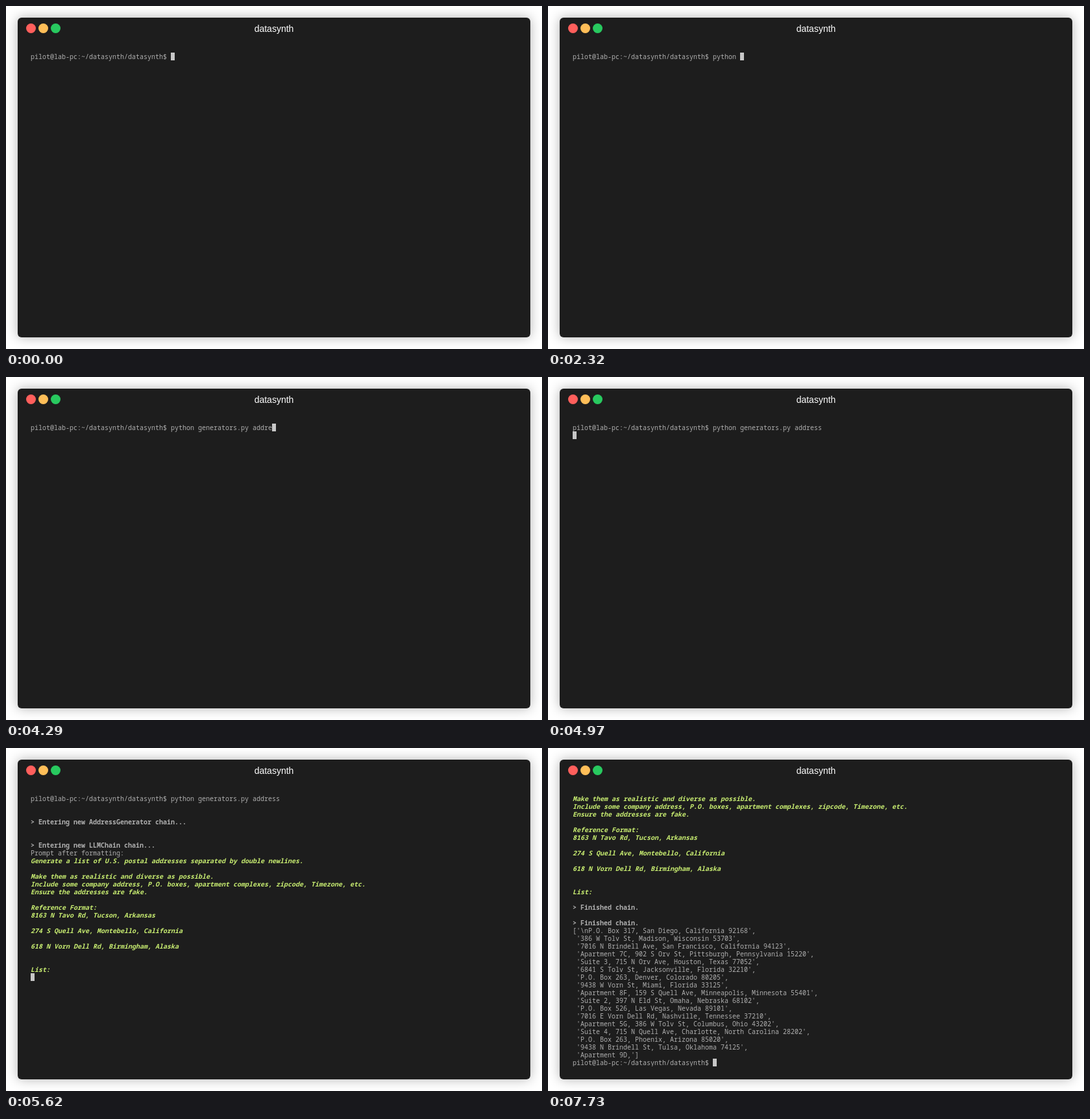
These frames come from a looping animation (826 px wide and 530 px high, 8 s). An HTML page:

```html
<!DOCTYPE html>
<html lang="en">
<head>
<meta charset="utf-8">
<title>datasynth</title>
<style>
  html, body { margin: 0; width: 100%; height: 100%; overflow: hidden; background: #fff; }
  #window {
    position: absolute; left: 18px; top: 18px; width: 790px; height: 494px;
    border-radius: 6px; background: #1d1d1d; box-shadow: 0 0 18px rgba(0, 0, 0, .3);
  }
  .dot { position: absolute; top: 9px; width: 15px; height: 15px; border-radius: 50%; }
  #title {
    position: absolute; left: 0; top: 9px; width: 790px; text-align: center;
    font: 14px/16px "Liberation Sans", Arial, sans-serif; color: #fff;
  }
  #screen {
    position: absolute; left: 20px; top: 54px; width: 750px; height: 420px; overflow: hidden;
    font: 10px/12px "Noto Sans Mono", "DejaVu Sans Mono", monospace;
    color: #afafaf; white-space: pre;
  }
  #screen div { height: 12px; }
  .bold { font-weight: 700; }
  .green { font-weight: 700; font-style: italic; color: #c8ed71; }
  #screen #cursor { position: absolute; width: 6px; height: 12px; background: #c7c7c7; }
</style>
</head>
<body>
<div id="window">
  <div class="dot" style="left:13px;background:#ff5f5c"></div>
  <div class="dot" style="left:32px;background:#ffbe58"></div>
  <div class="dot" style="left:51px;background:#28c95f"></div>
  <div id="title">datasynth</div>
  <div id="screen"></div>
</div>
<script>
const LOOP = 8000, CELL_W = 6, CELL_H = 12;
const prompt = 'pilot@lab-pc:~/datasynth/datasynth$ ';
const command = 'python generators.py address';

const entering = `

> Entering new AddressGenerator chain...


> Entering new LLMChain chain...`;

const request = `Generate a list of U.S. postal addresses separated by double newlines.

Make them as realistic and diverse as possible.
Include some company address, P.O. boxes, apartment complexes, zipcode, Timezone, etc.
Ensure the addresses are fake.

Reference Format:
8163 N Tavo Rd, Tucson, Arkansas

274 S Quell Ave, Montebello, California

618 N Vorn Dell Rd, Birmingham, Alaska


List:`;

const finished = `
> Finished chain.

> Finished chain.`;

const addresses = [
  '\\nP.O. Box 317, San Diego, California 92168',
  '386 W Tolv St, Madison, Wisconsin 53703',
  '7016 N Brindell Ave, San Francisco, California 94123',
  'Apartment 7C, 902 S Orv St, Pittsburgh, Pennsylvania 15220',
  'Suite 3, 715 N Orv Ave, Houston, Texas 77052',
  '6841 S Tolv St, Jacksonville, Florida 32210',
  'P.O. Box 263, Denver, Colorado 80205',
  '9438 W Vorn St, Miami, Florida 33125',
  'Apartment 8F, 159 S Quell Ave, Minneapolis, Minnesota 55401',
  'Suite 2, 397 N Eld St, Omaha, Nebraska 68102',
  'P.O. Box 526, Las Vegas, Nevada 89101',
  '7016 E Vorn Dell Rd, Nashville, Tennessee 37210',
  'Apartment 5G, 386 W Tolv St, Columbus, Ohio 43202',
  'Suite 4, 715 N Quell Ave, Charlotte, North Carolina 28202',
  'P.O. Box 263, Phoenix, Arizona 85020',
  '9438 N Brindell St, Tulsa, Oklahoma 74125',
  'Apartment 9D,'
];
const result = '[' + addresses.map(a => `'${a}'`).join(',\n ') + ']';

const block = (text, style = '') => text.split('\n').map(line => [line, style]);
const typed = n => [[prompt + command.slice(0, n), '']];

const entered = typed(command.length);
const started = [...entered, ...block(entering, 'bold')];
const asked = [...started, ...block('Prompt after formatting:'), ...block(request, 'green')];
const answered = [...asked, ...block(finished, 'bold'), ...block(result)].slice(10);

// Each state: start time, lines, and whether the cursor waits on a new line.
const states = [];
const add = (at, lines, newLine = false) => states.push({ at, lines, newLine });

add(0, typed(0));
[1330, 1620, 1800, 1913, 2027, 2140, 2320, 2490, 2590].forEach((at, i) => add(at, typed(i + 1)));
add(2870, typed(21)); // tab completion
[3530, 3770, 3910, 4120, 4290, 4530, 4710].forEach((at, i) => add(at, typed(22 + i)));
add(4970, entered, true);
add(5520, started, true);
add(5620, asked, true);
add(7620, answered, true);
add(7730, [...answered, [prompt, '']]);

const screen = document.getElementById('screen');
const cursor = document.createElement('div');
cursor.id = 'cursor';

function show({ lines, newLine }) {
  const rows = lines.map(([text, style]) => {
    const row = document.createElement('div');
    row.className = style;
    row.textContent = text;
    return row;
  });
  const last = lines.length - 1;
  cursor.style.left = (newLine ? 0 : lines[last][0].length * CELL_W) + 'px';
  cursor.style.top = (newLine ? last + 1 : last) * CELL_H + 'px';
  screen.replaceChildren(...rows, cursor);
}

let current;
function tick() {
  const t = performance.now() % LOOP;
  const state = states.findLast(s => s.at <= t);
  if (state !== current) show(current = state);
  requestAnimationFrame(tick);
}
tick();
</script>
</body>
</html>
```
